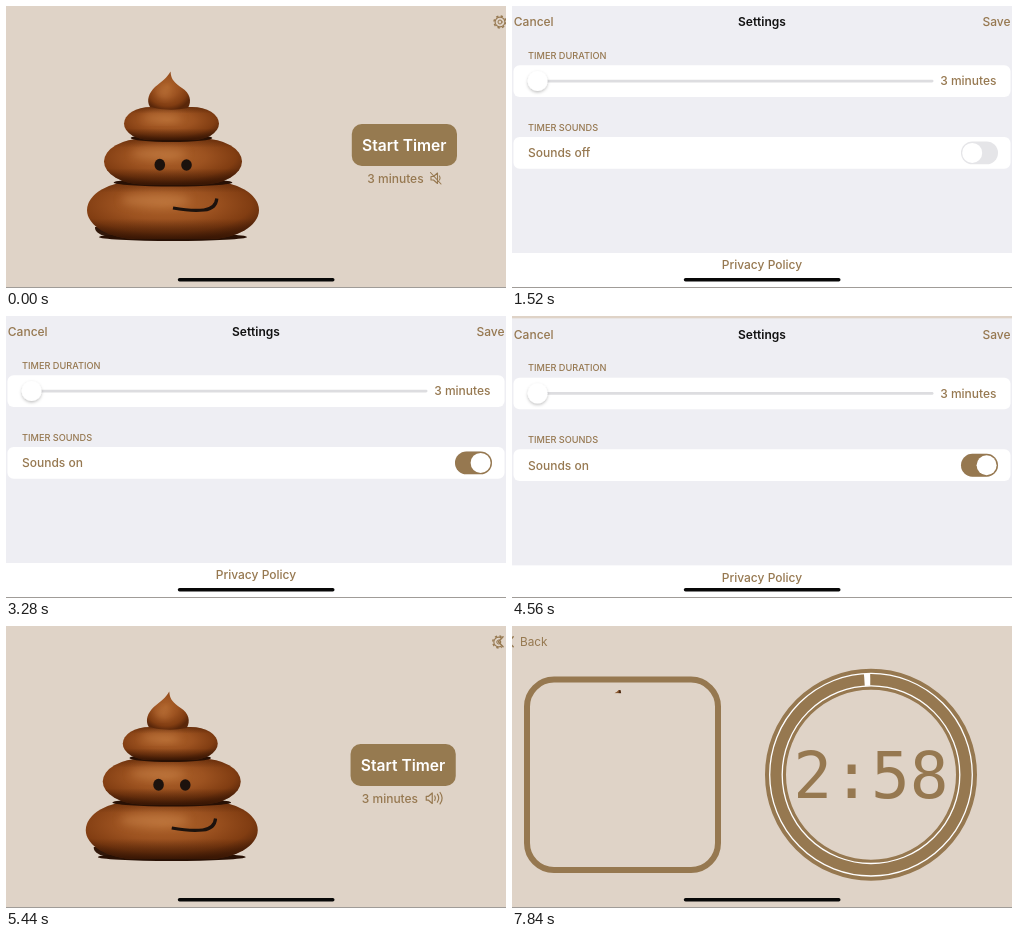
Animation of 500x282 px, one loop 8000 ms. Source, as an HTML page:

```html
<!DOCTYPE html>
<html lang="en">
<head>
<meta charset="utf-8">
<title>Timer</title>
<style>
  html, body { margin: 0; width: 100%; height: 100%; overflow: hidden; background: #dfd3c7; }
  svg { display: block; width: 100vw; height: 100vh; }
  text { font: 500 12px Inter, "Noto Sans", sans-serif; fill: #967850; }
  .mid { text-anchor: middle; }
  .end { text-anchor: end; }
  .head { font-size: 9.2px; }
  .title { font-weight: 600; fill: #111; }
  .start { font-size: 15.6px; font-weight: 600; fill: #fff; }
  .back { font-weight: 400; font-size: 11.8px; }
  .clock { font: 64.5px "DejaVu Sans Mono", monospace; }
  .line { fill: none; stroke: #967850; stroke-linecap: round; stroke-linejoin: round; }
</style>
</head>
<body>
<svg viewBox="0 0 500 282" preserveAspectRatio="none">
  <defs>
    <radialGradient id="skin" cx=".46" cy=".4" r=".62">
      <stop offset="0" stop-color="#ae632b"/>
      <stop offset=".45" stop-color="#9c5220"/>
      <stop offset=".8" stop-color="#813d12"/>
      <stop offset="1" stop-color="#5a270a"/>
    </radialGradient>
    <linearGradient id="shade" x1="0" y1="0" x2="0" y2="1">
      <stop offset="0" stop-color="#3a1603" stop-opacity=".35"/>
      <stop offset=".2" stop-color="#3a1603" stop-opacity="0"/>
      <stop offset=".65" stop-color="#3a1603" stop-opacity="0"/>
      <stop offset="1" stop-color="#2c1002" stop-opacity=".75"/>
    </linearGradient>
    <filter id="soft" x="-50%" y="-50%" width="200%" height="200%"><feGaussianBlur stdDeviation="4"/></filter>
    <filter id="drop" x="-50%" y="-50%" width="200%" height="200%">
      <feDropShadow dx="0" dy="1.5" stdDeviation="1.8" flood-opacity=".25"/>
    </filter>
    <clipPath id="reveal"><rect id="revealBox" x="100" y="64" width="12" height="1"/></clipPath>
  </defs>

  <g id="home">
    <rect width="500" height="282" fill="#dfd3c7"/>
    <g id="gear" class="line" transform="translate(494 16)">
      <circle r="4.9" stroke-width="1.1"/>
      <circle r="2" stroke-width="1"/>
      <circle r="6" stroke-width="1.4" stroke-dasharray="2.3 2.412" stroke-linecap="butt"/>
    </g>
    <path d="M89 221Q88 230 112 232Q160 236 215 231L240 222Z" fill="#32180a"/>
    <g id="tiers"></g>
    <path id="tip" d="M164.500 65.500C165 74 169 77 176 82C184 87 186 95 182 102Q163 106 144 101C140 94 143 87 149 81C156 75 161 72 164.500 65.500Z"/>
    <ellipse cx="158" cy="87" rx="6" ry="5" fill="#d08a50" opacity=".5" filter="url(#soft)"/>
    <g fill="#1c120d">
      <ellipse cx="153.800" cy="158.700" rx="5.300" ry="6"/>
      <ellipse cx="180.500" cy="159" rx="5.300" ry="5.800"/>
    </g>
    <path d="M167 202Q186 205.500 198 204Q210 202.500 210.800 192.500" fill="none" stroke="#1c120d" stroke-width="3.200"/>
    <rect x="345.800" y="118" width="105.200" height="42" rx="10" fill="#967a50"/>
    <text class="start mid" x="398.300" y="145">Start Timer</text>
    <g id="mute">
      <text x="361.300" y="176.800">3 minutes</text>
      <path class="line" stroke-width="1.1" d="M425 170.500h2.500l4-3.500v10.500l-4-3.500H425ZM424.500 166.500l10.500 11.500M433.500 170q1.200 2 0 4"/>
    </g>
    <g id="loud">
      <text x="357" y="176.800">3 minutes</text>
      <path class="line" stroke-width="1.200" d="M421.500 170.300h2.300l3.700-3.300v10.500l-3.700-3.300h-2.300ZM430 170q1.400 2.200 0 4.400M432.600 168.200q2.700 4 0 8M435.300 166.500q4.200 5.700 0 11.400"/>
    </g>
  </g>

  <g id="timer">
    <rect width="500" height="282" fill="#dfd3c7"/>
    <path class="line" stroke-width="1.500" d="M1.200 10.800L-3.500 15.800L1.200 20.800"/>
    <text class="back" x="8" y="20.200">Back</text>
    <rect class="line" x="15" y="53.600" width="191" height="190.400" rx="27" stroke-width="6"/>
    <g clip-path="url(#reveal)">
      <path d="M106.600 64h1.700L109.200 67.300L102.300 67.200Q105.500 66 106.600 64Z" fill="#8a572e"/>
      <path d="M107.400 64h.9L109.200 67.300H106.500Z" fill="#4b2a14"/>
    </g>
    <g fill="none" transform="translate(359 148.700)">
      <circle r="95.500" stroke="#967850" stroke-width="21"/>
      <circle r="101.300" stroke="#fff" stroke-width="1.300"/>
      <circle r="88.800" stroke="#fff" stroke-width="1.300"/>
      <path id="gap" fill="#fff"/>
    </g>
    <text id="clock" class="clock mid" x="359" y="172"></text>
  </g>

  <g id="sheet">
    <rect width="500" height="282" fill="#eeeef3"/>
    <text x="1.800" y="20.300">Cancel</text>
    <text class="title mid" x="250" y="20.300">Settings</text>
    <text class="end" x="498.500" y="20.300">Save</text>
    <text class="head" x="16" y="52.500">TIMER DURATION</text>
    <text class="head" x="16" y="124.500">TIMER SOUNDS</text>
    <g fill="#fff">
      <rect x="1.500" y="59.300" width="497" height="31.700" rx="6"/>
      <rect x="1.500" y="131" width="497" height="31.700" rx="6"/>
      <rect y="247" width="500" height="35"/>
    </g>
    <rect x="17" y="73.700" width="404.500" height="2.800" rx="1.400" fill="#dddde0"/>
    <circle cx="25.600" cy="75" r="10" fill="#fff" filter="url(#drop)"/>
    <text class="end" x="484.500" y="79.300">3 minutes</text>
    <text id="sounds" x="16" y="151.300"></text>
    <rect x="449" y="135.500" width="37" height="22.800" rx="11.400" fill="#e5e5e8"/>
    <rect id="track" x="449" y="135.500" width="37" height="22.800" rx="11.400" fill="#967850"/>
    <circle id="knob" cy="146.900" r="10" fill="#fff"/>
    <text class="mid" x="250" y="263.300">Privacy Policy</text>
  </g>

  <rect x="171.800" y="272" width="156.700" height="3.500" rx="1.750" fill="#080808"/>
  <rect y="281" width="500" height="1" fill="#a09c98"/>
</svg>
<script>
const LOOP = 8000;
const $ = id => document.getElementById(id);
const clamp = v => Math.max(0, Math.min(1, v));
const span = (t, from, to) => clamp((t - from) / (to - from));
const easeOut = p => 1 - (1 - p) ** 2;
const smooth = p => p * p * (3 - 2 * p);
const move = (id, x, y) => $(id).setAttribute("transform", `translate(${x} ${y})`);
const show = (id, on) => $(id).setAttribute("visibility", on ? "visible" : "hidden");

// Stacked rounded tiers: left, top, width, height, corner radius
const tiers = [[81, 175, 172, 58, 50], [98, 132.5, 138, 46, 40], [118, 101, 95, 33, 27]];
$("tiers").innerHTML = tiers.map(([x, y, w, h, r]) => {
  const box = `x="${x}" y="${y}" width="${w}" height="${h}" rx="${r}" ry="${h / 2}"`;
  return `<ellipse cx="${x + w / 2}" cy="${y + h - 2}" rx="${w * 0.43}" ry="4" fill="#281004"/>
    <rect ${box} fill="url(#skin)"/><rect ${box} fill="url(#shade)"/>
    <ellipse cx="${x + w * 0.4}" cy="${y + h * 0.33}" rx="${w * 0.2}" ry="${h * 0.12}"
      fill="#cf8950" opacity=".5" filter="url(#soft)"/>`;
}).join("");
$("tip").setAttribute("fill", "url(#skin)");

function wedge(seconds) {
  const a = seconds * 2 * Math.PI / 180;
  const at = (r, k) => `${-r * Math.sin(k)} ${-r * Math.cos(k)}`;
  const start = 0.008;
  return seconds ? `M${at(101, start)}L${at(101, a)}L${at(89, a)}L${at(89, start)}Z` : "";
}

function draw(t) {
  const sheet = easeOut(span(t, 1360, 1520)) - easeOut(span(t, 4560, 4800));
  const push = easeOut(span(t, 5440, 5680));
  const toggle = smooth(span(t, 2280, 2540));
  const loud = t >= 4560;
  const elapsed = t < 6480 ? 0 : t < 7840 ? 1 : 2;

  move("home", -150 * push, 0);
  move("timer", 500 * (1 - push), 0);
  move("sheet", 0, 282 * (1 - sheet));
  show("timer", push > 0);
  show("sheet", sheet > 0);
  show("mute", !loud);
  show("loud", loud);

  $("sounds").textContent = t < 2320 ? "Sounds off" : "Sounds on";
  $("track").setAttribute("opacity", toggle);
  $("knob").setAttribute("cx", 460.200 + 14.400 * toggle);

  $("clock").textContent = elapsed ? `2:${60 - elapsed}` : "3:00";
  $("gap").setAttribute("d", wedge(elapsed));
  $("revealBox").setAttribute("height", 1 + 1.200 * elapsed);
}

const begin = performance.now();
function tick() {
  draw((performance.now() - begin) % LOOP);
  requestAnimationFrame(tick);
}
tick();
</script>
</body>
</html>
```
